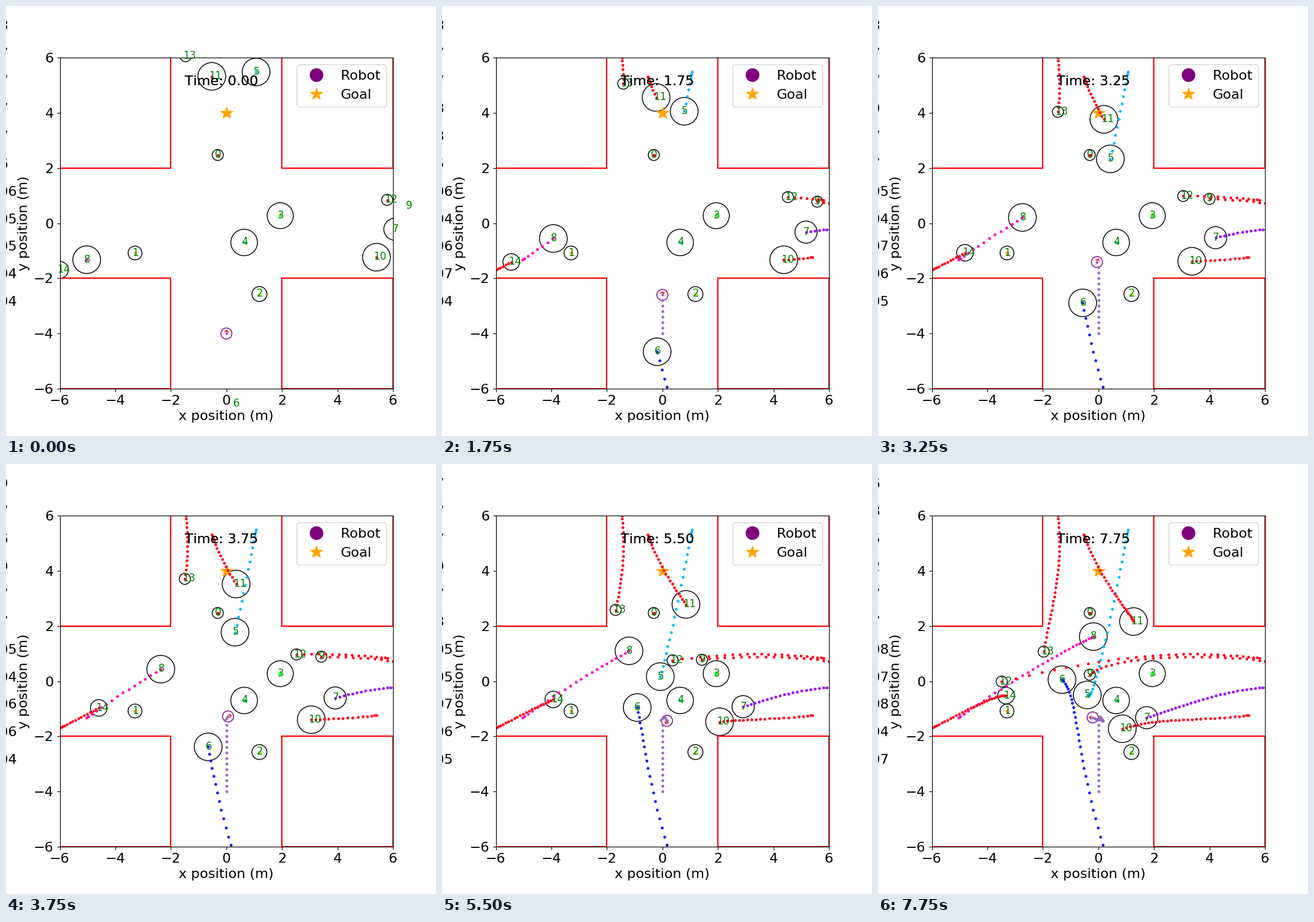
Recreate the animation shown at these times as a matplotlib script. Size 700 by 700 pixels, loop 8000 ms.

```python
import matplotlib
import matplotlib.pyplot as plt
import numpy as np
from matplotlib.animation import FuncAnimation
from matplotlib.lines import Line2D
from matplotlib.patches import ArrowStyle, Circle, FancyArrowPatch

STEPS = 32
STEP_MS = 250
ROBOT_RADIUS = 0.2

plt.rcParams["text.kerning_factor"] = 6

RADII = [0.2, 0.25, 0.27, 0.47, 0.48, 0.5, 0.5, 0.4,
         0.5, 0.2, 0.5, 0.5, 0.2, 0.2, 0.3]

# People 0 to 4 stand still
STANDING = [(-0.31, 2.47), (-3.29, -1.08), (1.19, -2.57), (1.94, 0.27), (0.64, -0.70)]

# People 5 to 14 pass four waypoints, evenly spaced in walking time
WALKS = [
    [(1.07, 5.48), (0.52, 2.75), (-0.04, 0.30), (-0.40, -0.50)],
    [(0.35, -6.55), (-0.49, -3.29), (-0.88, -1.08), (-1.31, 0.055)],
    [(6.07, -0.22), (4.45, -0.47), (3.01, -0.89), (1.74, -1.325)],
    [(-5.03, -1.325), (-3.02, 0.03), (-1.31, 1.04), (-0.18, 1.615)],
    [(6.56, 0.62), (4.42, 0.865), (1.62, 0.80), (-0.31, 0.235)],
    [(5.405, -1.235), (3.60, -1.37), (2.16, -1.46), (0.86, -1.725)],
    [(-0.525, 5.32), (0.09, 3.95), (0.80, 2.85), (1.265, 2.16)],
    [(5.79, 0.845), (3.43, 0.985), (0.62, 0.79), (-3.48, -0.015)],
    [(-1.47, 6.05), (-1.435, 4.28), (-1.66, 2.70), (-1.97, 1.07)],
    [(-5.99, -1.69), (-4.96, -1.155), (-3.99, -0.69), (-3.325, -0.525)],
]

# The robot drives up, swerves, waits and leaves: (step, x, y)
ROBOT_WALK = [(0, 0, -4), (12, 0, -1.6), (13, -0.05, -1.41), (15, 0.06, -1.28),
              (18, 0.17, -1.44), (26, 0.16, -1.435), (31, -0.205, -1.315)]

steps = np.arange(STEPS)
# Walkers get up to speed during the first second
walked = steps - 1.8 * (1 - np.exp(-steps / 2))
walked /= walked[-1]


def walk(points):
    """Cubic path through four evenly timed waypoints."""
    fit = np.polyfit(np.linspace(0, 1, 4), np.array(points), 3)
    return np.column_stack([np.polyval(c, walked) for c in fit.T])


paths = [np.tile(p, (STEPS, 1)) for p in STANDING] + [walk(w) for w in WALKS]

keys, *coords = np.array(ROBOT_WALK, float).T
robot_path = np.column_stack([np.interp(steps, keys, c) for c in coords])
angles = np.radians(np.interp(steps, [12, 18, 26], [90, -40, -180]))

# Scores of people 4 to 14 drift slowly
rng = np.random.default_rng(4)
drift = rng.normal(0, 0.004, (11, STEPS)).cumsum(axis=1)
scores = np.clip(np.linspace(0.08, 0.04, 11)[:, None] + drift, 0.02, 0.13)

fig, ax = plt.subplots(figsize=(7, 7), dpi=100)
ax.set_xlim(-6, 6)
ax.set_ylim(-6, 6)
ax.set_xticks(range(-6, 7, 2))
ax.set_yticks(range(-6, 7, 2))
ax.tick_params(labelsize=16)
ax.set_xlabel("x position (m)", fontsize=16)
ax.set_ylabel("y position (m)", fontsize=16)

unit = np.array([2, 6, 6, 2, 2])
for sx in (-1, 1):
    for sy in (-1, 1):
        ax.plot(sx * unit, sy * np.array([2, 2, 6, 6, 2]), color="red", lw=1.5)

goal = Line2D([0], [4], color="orange", marker="*", linestyle="None", markersize=15)
ax.add_line(goal)
robot_key = Line2D([], [], color="purple", marker="o", linestyle="None", markersize=15)
ax.legend([robot_key, goal], ["Robot", "Goal"], fontsize=16, loc="upper right")


def add_circle(radius, color):
    return ax.add_patch(Circle((0, 0), radius, fill=False, edgecolor=color, lw=1))


def add_trail(color):
    return ax.plot([], [], "o", color=color, markersize=3.3, markeredgewidth=0)[0]


hues = matplotlib.colormaps["hsv"].resampled(10)
circles = [add_circle(r, "black") for r in RADII]
trails = [add_trail(hues(min(i, 9))) for i in range(len(RADII))]
labels = [ax.text(0, 0, str(i), color="green", fontsize=12) for i in range(len(RADII))]

robot = add_circle(ROBOT_RADIUS, "purple")
robot_trail = add_trail("tab:purple")
arrow = ax.add_patch(FancyArrowPatch(
    (0, 0), (0, 1), color="red", arrowstyle=ArrowStyle("->", head_length=2, head_width=2)))

# The clock is printed twice, which thickens its strokes
clocks = [ax.text(-1.5, 5, "", fontsize=16) for _ in range(2)]
# The score column runs off the left edge; two-digit rows reach further right
score_texts = [ax.text(-8.95 if row < 6 else -8.64, 7 - row, "", fontsize=16)
               for row in range(len(scores))]


def update(k):
    for path, circle, trail, label in zip(paths, circles, trails, labels):
        x, y = path[k]
        circle.center = (x, y)
        trail.set_data(*path[:k + 1].T)
        label.set_position((x - 0.1, y - 0.1))

    x, y = robot_path[k]
    robot.center = (x, y)
    robot_trail.set_data(*robot_path[:k + 1].T)
    arrow.set_positions((x, y), (x + ROBOT_RADIUS * np.cos(angles[k]),
                                 y + ROBOT_RADIUS * np.sin(angles[k])))

    for clock in clocks:
        clock.set_text(f"Time: {k * STEP_MS / 1000:.2f}")
    for text, score in zip(score_texts, scores[:, k]):
        text.set_text(f"{score:.2f}")
    return []


anim = FuncAnimation(fig, update, frames=STEPS, init_func=lambda: update(0),
                     interval=STEP_MS, repeat=True, repeat_delay=0)
plt.show()
```
